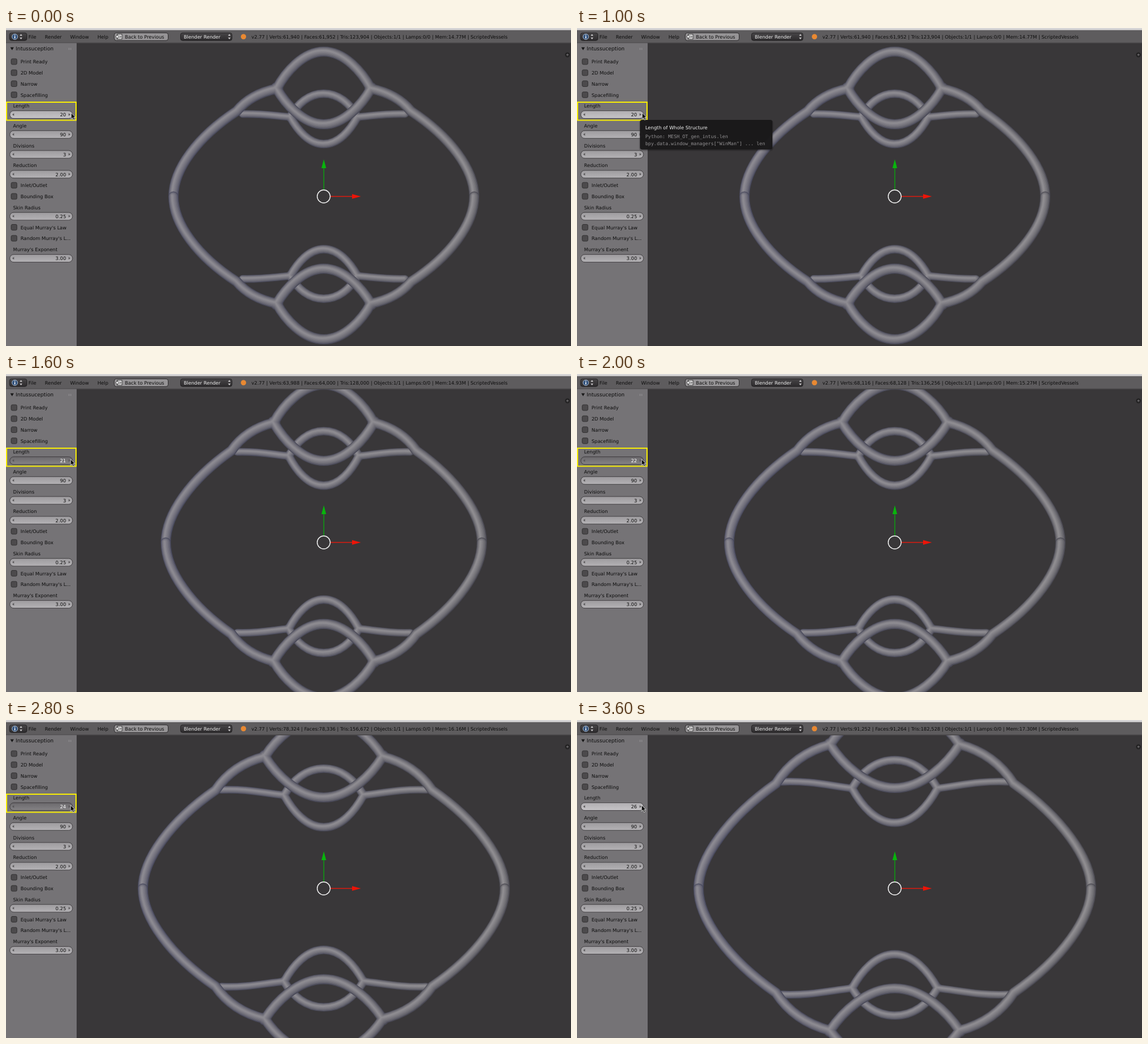
An HTML page with a canvas for the animation above (3800 ms loop, 960 by 540 pixels).

```html
<!DOCTYPE html>
<html lang="en">
<head>
<meta charset="utf-8">
<title>Vessel length</title>
<style>
  html, body { margin: 0; width: 100%; height: 100%; overflow: hidden; background: #393739; }
  canvas, svg { position: absolute; left: 0; top: 0; width: 960px; height: 540px; display: block; }
  text { font: 8.05px "DejaVu Sans", sans-serif; text-rendering: geometricPrecision; white-space: pre; fill: #0c0c0c; }
  .title { font-size: 8.75px; }
  .mono { font-family: "DejaVu Sans Mono", monospace; fill: #929092; }
  .light { fill: #f0f0f0; }
  .value { text-anchor: end; }
</style>
</head>
<body>
<canvas id="view" width="960" height="540"></canvas>
<svg id="ui" viewBox="0 0 960 540">
  <defs>
    <linearGradient id="field" x2="0" y2="1"><stop stop-color="#9d9b9e"/><stop offset="1" stop-color="#b4b2b5"/></linearGradient>
    <linearGradient id="hover" x2="0" y2="1"><stop stop-color="#b0aeb1"/><stop offset="1" stop-color="#c6c4c7"/></linearGradient>
    <linearGradient id="pressed" x2="0" y2="1"><stop stop-color="#6b696c"/><stop offset="1" stop-color="#858386"/></linearGradient>
    <linearGradient id="dark" x2="0" y2="1"><stop stop-color="#474547"/><stop offset="1" stop-color="#2d2b2d"/></linearGradient>
  </defs>

  <g fill="none">
    <path d="M540 275V237" stroke="#0ba20f" stroke-width="1.4"/>
    <path d="M551 286H589" stroke="#d81b10" stroke-width="1.4"/>
    <path d="M536 238L540 223L544 238Z" fill="#08b40c"/>
    <path d="M588 282L603 286L588 290Z" fill="#ec1408"/>
    <circle cx="539.8" cy="286" r="11" stroke="#f4f4f4" stroke-width="1.4"/>
  </g>
  <circle cx="954" cy="45.5" r="4.2" fill="#242324"/>
  <path d="M952 45.5h4M954 43.5v4" stroke="#777577"/>

  <rect width="960" height="26" fill="#5e5c5e"/>
  <rect width="960" height="3.6" fill="#d6d5d6"/>
  <rect y="24.7" width="960" height="1" fill="#413f41"/>
  <g stroke="#1c1b1c" stroke-width=".8">
    <rect x="6" y="8.3" width="29.5" height="13" rx="3.5" fill="url(#dark)"/>
    <rect x="184" y="8.3" width="91.5" height="13" rx="3.5" fill="#969496"/>
    <rect x="296.5" y="8.3" width="87.5" height="13" rx="3.5" fill="url(#dark)"/>
  </g>
  <circle cx="15" cy="14.8" r="4.8" fill="#33537d" stroke="#c4d2e4" stroke-width=".8"/>
  <path d="M15 13.8v4M15 11.4v1.4" stroke="#fff" stroke-width="1.5"/>
  <path d="M23.3 13.3l2.2-3 2.2 3zM23.3 16.3l2.2 3 2.2-3zM377.3 13.3l2.2-3 2.2 3zM377.3 16.3l2.2 3 2.2-3z" fill="#d0ced0"/>
  <rect x="189" y="10.5" width="8" height="8.5" fill="#dddcdd" stroke="#222" stroke-width=".8"/>
  <path d="M186 14.8l4-3v2h5v2h-5v2z" fill="#fff" stroke="#222" stroke-width=".7"/>
  <circle cx="403.5" cy="14.8" r="4.5" fill="#e98932"/>
  <text x="38" y="18">File</text>
  <text x="66" y="18">Render</text>
  <text x="109" y="18">Window</text>
  <text x="155.5" y="18">Help</text>
  <text x="202" y="18">Back to Previous</text>
  <text x="302" y="18" class="light">Blender Render</text>
  <text x="417" y="18" id="stats"></text>

  <rect y="25.5" width="120" height="515" fill="#757376"/>
  <path d="M7.3 32.8h6l-3 5z" fill="#181818"/>
  <text x="16.5" y="38.4" class="title">Intussuception</text>
  <path d="M106 34.5h6M106 36.5h6" stroke="#9c9a9d" stroke-dasharray="1 1"/>
  <g id="panel"></g>
  <rect id="frame" x="1" y="126" width="118" height="30.6" fill="none" stroke="#f4ea08" stroke-width="2"/>

  <g id="tip">
    <rect x="105.5" y="156" width="228" height="53" rx="5" fill="#000" opacity=".18"/>
    <rect x="107" y="156" width="225" height="50.5" rx="4" fill="#191819" opacity=".96"/>
    <text x="116" y="172" class="light">Length of Whole Structure</text>
    <text x="116" y="187.4" class="mono">Python: MESH_OT_gen_intus.len</text>
    <text x="116" y="199.2" class="mono">bpy.data.window_managers["WinMan"] ... len</text>
  </g>
  <path id="cursor" d="M0 0V10.2L2.4 8L4.1 12L6 11.1L4.3 7.3H7.3Z" fill="#080808" stroke="#e8e8e8" stroke-width=".8"/>
</svg>

<script>
const LOOP = 3800;
const STEPS = [1200, 1700, 2100, 2500, 2900, 3400];
const PRESS = 200, TIP_ON = 500, TIP_OFF = 1100, FRAME_OFF = 3600;
const VERTS = [61940, 63988, 68116, 73204, 78324, 84724, 91252];
const MEMORY = ["14.77", "14.93", "15.27", "15.71", "16.16", "16.73", "17.30"];

const $ = id => document.getElementById(id);
const ctx = $("view").getContext("2d");
const comma = n => n.toLocaleString("en-US");

const checkbox = (y, label) =>
  `<rect x="8.8" y="${y - 5}" width="9.8" height="9.8" rx="2.2" fill="#4c4a4c" stroke="#2a292a" stroke-width=".8"/>
   <text x="24.7" y="${y + 3}">${label}</text>`;

const field = (y, label, value, id = "") =>
  `<text x="12" y="${y - 11.8}">${label}</text>
   <rect ${id && `id="${id}"`} x="6.5" y="${y - 6.4}" width="106.5" height="13" rx="6.5" fill="url(#field)" stroke="#343234" stroke-width=".8"/>
   <path d="M13.6 ${y - 2.2}v4.4l-3-2.2zM106.4 ${y - 2.2}v4.4l3-2.2z" fill="#565456"/>
   <text ${id && `id="${id}Value"`} class="value" x="102" y="${y + 3.3}">${value}</text>`;

$("panel").innerHTML = [
  checkbox(57.2, "Print Ready"), checkbox(76, "2D Model"),
  checkbox(94.7, "Narrow"), checkbox(113.5, "Spacefilling"),
  field(147, "Length", 20, "length"), field(180.7, "Angle", 90),
  field(214.5, "Divisions", 3), field(248.2, "Reduction", "2.00"),
  checkbox(267.2, "Inlet/Outlet"), checkbox(286, "Bounding Box"),
  field(319.6, "Skin Radius", "0.25"),
  checkbox(338.5, "Equal Murray's Law"), checkbox(357.2, "Random Murray's L..."),
  field(391, "Murray's Exponent", "3.00")
].join("");

// Shaded tube: nested strokes that brighten and drift toward the light.
function drawTubes(parts) {
  const layers = 8;
  for (let i = 0; i < layers; i++) {
    const k = i / (layers - 1), rise = Math.pow(k, 0.65);
    const mix = (a, b) => Math.round(a + (b - a) * rise);
    const shade = ctx.createLinearGradient(200, 0, 880, 0);
    shade.addColorStop(0, `rgb(${mix(72, 139)},${mix(73, 137)},${mix(94, 145)})`);
    shade.addColorStop(1, `rgb(${mix(73, 143)},${mix(72, 141)},${mix(80, 144)})`);
    ctx.strokeStyle = shade;
    for (const [path, width] of parts) {
      ctx.save();
      ctx.translate(-width * 0.13 * k, -width * 0.11 * k);
      ctx.lineWidth = width * (1 - 0.87 * k);
      ctx.stroke(path);
      ctx.restore();
    }
  }
}

// Points are offsets from the vertical axis plus a height in the upper half.
function drawVessels(u) {
  const v = Math.ceil(u / 2);
  const half = 255.5 + 13 * u;
  const joint = [148 + 9 * u, 141 - 11 * v];
  const fork = [80 + 5 * u, 103 - 20.5 * v];
  const inner = [57 + 2.6 * u, 151 - 11.7 * v];
  const stub = [138 + 9 * u, 146 - 13.7 * v];
  const between = (a, b, fx, fy) => [a[0] + (b[0] - a[0]) * fx, a[1] + (b[1] - a[1]) * fy];

  ctx.clearRect(0, 0, 960, 540);
  ctx.lineCap = ctx.lineJoin = "round";
  for (const lower of [false, true]) {
    const backLoop = new Path2D(), stubs = new Path2D();
    const front = new Path2D(), forks = new Path2D(), innerForks = new Path2D();
    for (const side of [-1, 1]) {
      const place = ([x, y]) => {
        const d = 286 - y;
        return [540 + side * x, lower ? 286 + d * (1.016 - d * 0.00012) : y];
      };
      const curve = (path, a, b, c, d) => {
        path.moveTo(...place(a));
        path.bezierCurveTo(...place(b), ...place(c), ...place(d));
      };
      const arc = (path, from, y, fx, fy) => {
        const top = [0, y];
        curve(path, from, between(from, top, fx, fy), between(from, top, 0.56, 1), top);
      };
      const dot = (path, p) => {
        const [x, y] = place(p);
        path.moveTo(x, y);
        path.lineTo(x + 0.01, y);
      };
      curve(front, [half, 286], [half, 240 - 1.3 * v],
        [215 + 11.6 * u, 185 - 6.3 * v], joint);
      curve(front, joint, between(joint, fork, 0.25, 0.55),
        between(joint, fork, 0.6, 0.85), fork);
      arc(front, fork, 163.5 - 16 * v, 0.18, 0.42);
      arc(front, fork, 40 - 22 * v, 0.18, 0.44);
      arc(backLoop, inner, 111.5 - 14.5 * v, 0.22, 0.58);
      arc(backLoop, inner, 197 - 7.5 * v, 0.22, 0.5);
      curve(stubs, stub, between(stub, inner, 0.4, -0.2),
        between(stub, inner, 0.68, 0.6), inner);
      dot(forks, fork);
      dot(innerForks, inner);
    }
    drawTubes([[stubs, 13], [innerForks, 17], [backLoop, 14.5]]);
    drawTubes([[forks, 22], [front, 17.2]]);
  }
}

let shown = -1;
function showLength(u) {
  if (u === shown) return;
  shown = u;
  const verts = VERTS[u], faces = verts + 12;
  $("lengthValue").textContent = 20 + u;
  $("stats").textContent = `v2.77 | Verts:${comma(verts)} | Faces:${comma(faces)} | Tris:${comma(2 * faces)}` +
    ` | Objects:1/1 | Lamps:0/0 | Mem:${MEMORY[u]}M | ScriptedVessels`;
  drawVessels(u);
}

function render(now) {
  const t = now % LOOP;
  const pressed = t >= TIP_OFF && STEPS.some(s => t >= s - PRESS && t < s);
  showLength(STEPS.filter(s => t >= s).length);
  $("length").setAttribute("fill", `url(#${pressed ? "pressed" : "hover"})`);
  $("lengthValue").style.fill = pressed ? "#fff" : "";
  $("tip").style.display = t >= TIP_ON && t < TIP_OFF ? "" : "none";
  $("frame").style.display = t < FRAME_OFF ? "" : "none";
  $("cursor").setAttribute("transform", t < TIP_OFF ? "translate(110.8 144.3)" : "translate(109.8 144.8)");
}

const start = performance.now();
function tick() {
  render(performance.now() - start);
  requestAnimationFrame(tick);
}
tick();
</script>
</body>
</html>
```
